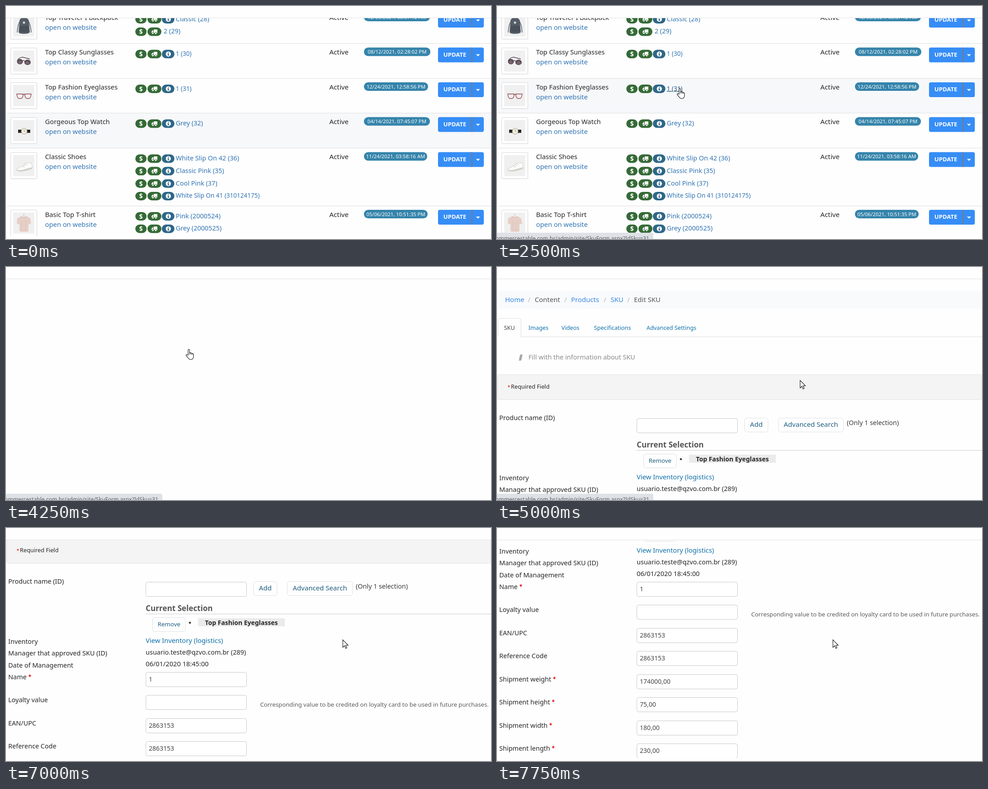
Write an HTML page that moves like this. It is 1080 by 519 pixels and loops after 8000 ms.

```html
<!DOCTYPE html>
<html lang="en">
<head>
<meta charset="utf-8">
<title>Editing a SKU</title>
<style>
  html, body { margin: 0; width: 100%; height: 100%; overflow: hidden; background: #fefefe; }
  svg { display: block; width: 100vw; height: 100vh; }
  text { font-family: "Noto Sans", "Open Sans", sans-serif; white-space: pre; }
</style>
</head>
<body>
<svg id="stage" viewBox="0 0 1080 519" xmlns="http://www.w3.org/2000/svg"></svg>
<script>
const LOOP = 8000;
const INK = '#262626', LINK = '#3174b3', FORM_LINK = '#0f70aa', GREEN = '#356a36', TEAL = '#3584ab';

const text = (x, y, size, fill, content, extra = '') =>
  `<text x="${x}" y="${y}" font-size="${size}" fill="${fill}" ${extra}>${content}</text>`;
const rect = (x, y, w, h, fill, r = 0, stroke = 'none') =>
  `<rect x="${x}" y="${y}" width="${w}" height="${h}" rx="${r}" fill="${fill}" stroke="${stroke}"/>`;
const path = (d, fill, extra = '') => `<path d="${d}" fill="${fill}" ${extra}/>`;
const group = (x, y, content) => `<g transform="translate(${x} ${y})">${content}</g>`;

// Product thumbnails, drawn inside a 59 x 59 frame
const art = {
  backpack:
    path('M22 18Q16 25 15 44M39 18Q45 25 46 44M25 14Q30 5 36 14', 'none', 'stroke="#59606a" stroke-width="1.5"') +
    path('M20 18Q21 11 30 11T41 18L43 43Q42 47 30 47T18 43Z', '#555d66') +
    path('M21 29H40L41 42Q31 45 20 42Z', '#48505a') +
    '<circle cx="30" cy="22" r="2.5" fill="#d9dcdf"/>',
  sunglasses:
    path('M15 29Q18 22 27 21L43 25M27 29Q30 27 32 31', 'none', 'stroke="#5a4953" stroke-width="1.5"') +
    '<ellipse cx="21" cy="31" rx="6.5" ry="6" fill="#51424d"/><ellipse cx="38" cy="32.5" rx="7" ry="6" fill="#51424d"/>' +
    '<ellipse cx="21" cy="32" rx="4.5" ry="4" fill="#77646f"/><ellipse cx="38" cy="33.5" rx="5" ry="4" fill="#77646f"/>',
  eyeglasses:
    path('M14 26H28Q28 36 23 36H18Q15 35 14 26ZM32 26H46Q45 35 42 36H37Q32 36 32 26ZM28 28Q30 26 32 28', '#f3eeee',
      'stroke="#8d4a50" stroke-width="1.4"'),
  watch:
    path('M17 27.5H25V34.5H17ZM36 27.5H44V34.5H36Z', '#22211f') +
    '<circle cx="30.5" cy="31" r="6.5" fill="#f3eee0" stroke="#a79f8b"/>' +
    path('M30.5 27V31L33 32', 'none', 'stroke="#817967" stroke-width=".8"'),
  shoes:
    path('M13 37Q20 35 27 30L35 22Q40 25 46 23L49 34Q42 38 30 41Q15 44 13 37Z', '#fbfbf9', 'stroke="#c9c8c2" stroke-width=".8"') +
    path('M13 38Q20 41 30 38T49 33V36Q39 41 27 42Q14 44 13 38Z', '#d2d0c8') +
    path('M27 30L31 33M30 27L34 30M33 24L37 27', 'none', 'stroke="#b5b3ac"'),
  shirt:
    path('M24 14L15 19 14 31 20 32 20 48Q30 50 40 48L40 32 46 31 44 19 35 14Q30 18 24 14Z', '#e6cfc6') +
    path('M24 14Q30 20 35 14M30 14Q28 9 31 9', 'none', 'stroke="#c9afa6"') +
    path('M25 24V47M34 23V48', 'none', 'stroke="#dac0b6" stroke-width=".8"'),
};
const thumb = (kind, y) => group(10, y,
  rect(.5, 1.5, 59, 58, '#ececec', 2) + rect(.5, .5, 58, 58, '#fff', 2, '#d8d8d8') +
  rect(6, 6, 47, 47, '#f0f0f0') + art[kind]);

function skuPills(y, withInfo) {
  const dollar = rect(288, -9.5, 25, 19, GREEN, 9.5) +
    text(300.5, 5, 14, '#fff', '$', 'font-weight="700" text-anchor="middle"');
  const truck = rect(315, -9.5, 31, 19, GREEN, 9.5) +
    path('M329-5H337V3H329ZM328-3H326L324 0V3H328Z', '#fff') +
    `<g fill="#fff" stroke="${GREEN}"><circle cx="327" cy="3.5" r="2.2"/><circle cx="333.5" cy="3.5" r="2.2"/></g>`;
  const info = rect(347, -9.5, 28, 19, '#2e6788', 9.5) + '<circle cx="361.5" r="5.7" fill="#fff"/>' +
    path('M360.5-4H362.7V-2.2H360.5ZM359.7-1H362.7V2.2H363.5V3.6H359.7V2.2H360.5V.4H359.7Z', '#2e6788');
  return group(0, y, dollar + truck + (withInfo ? info : ''));
}

const updateButton = y => group(962, y,
  rect(0, 0, 102, 33, '#368df6', 4) + rect(74, 0, 2.5, 33, '#6c7f92') +
  text(37.5, 20, 13.2, '#fff', 'UPDATE', 'font-weight="700" text-anchor="middle"') +
  path('M84.5 15H93.5L89 19.5Z', '#fff'));

const products = [
  { y: 5.5, h: 77.5, kind: 'backpack', name: 'Top Traveler I Backpack', skus: ['Classic (28)', '2 (29)'], date: '12/03/2021, 08:37:12 AM', w: 147 },
  { y: 83, h: 77.5, kind: 'sunglasses', name: 'Top Classy Sunglasses', skus: ['1 (30)'], date: '08/12/2021, 02:28:02 PM', w: 148 },
  { y: 160.5, h: 77.5, kind: 'eyeglasses', name: 'Top Fashion Eyeglasses', skus: ['1 (31)'], date: '12/24/2021, 12:58:56 PM', w: 143 },
  { y: 238, h: 78, kind: 'watch', name: 'Gorgeous Top Watch', skus: ['Grey (32)'], date: '04/14/2021, 07:45:07 PM', w: 147 },
  { y: 316, h: 128.5, kind: 'shoes', name: 'Classic Shoes', date: '11/24/2021, 03:58:16 AM', w: 141,
    skus: ['White Slip On 42 (36)', 'Classic Pink (35)', 'Cool Pink (37)', 'White Slip On 41 (310124175)'] },
  { y: 444.5, h: 90, kind: 'shirt', name: 'Basic Top T-shirt', skus: ['Pink (2000524)', 'Grey (2000525)'], date: '05/06/2021, 10:51:35 PM', w: 142 },
];

function productRow({ y, kind, name, skus, date, w }) {
  const skuLines = skus.map((sku, i) => {
    const withInfo = sku !== '2 (29)';
    const size = /1 ?\(/.test(sku) ? 13.6 : 14.5;
    const id = sku === '1 (31)' ? 'id="skuLink"' : '';
    return skuPills(y + 24 + i * 27.8, withInfo) +
      text(withInfo ? 378 : 351, y + 28 + i * 27.8, size, LINK, sku, id);
  }).join('');
  return rect(2, Math.round(y), 1078, 1, '#dedede') + thumb(kind, Math.round(y + 9.5)) +
    text(87, y + 25, 14.75, INK, name) + text(87, y + 47, 14.8, LINK, 'open on website') + skuLines +
    text(720, y + 25, 15.3, INK, 'Active') + rect(797, y + 9.5, w, 19, TEAL, 9.5) +
    text(797 + w / 2, y + 23, 11.3, '#fff', date, 'font-weight="500" text-anchor="middle"') +
    updateButton(y + 9.5);
}

const input = (y, value = '') =>
  rect(311.5, y, 224, 32, '#fff', 4, '#c8c8c8') + text(318, y + 20.5, 14.1, '#444', value);
const button = (x, y, w, label, size) =>
  rect(x + .5, y + .5, w - 1, 31, '#fefefe', 5, '#dee0e3') +
  text(x + w / 2, y + 20, size, '#1f5f80', label, 'text-anchor="middle"');
const star = ' <tspan fill="#e00" font-weight="700" font-size="12" dy="-1">*</tspan>';

function form() {
  const crumbs = [['Home', 18], ['Content', 84], ['Products', 165], ['SKU', 253], ['Edit SKU', 305]];
  const tabs = [['Images', 70], ['Videos', 143.5], ['Specifications', 216], ['Advanced Settings', 333]];
  const fields = [['Name' + star, '1'], ['Loyalty value', ''], ['EAN/UPC', '2863153'], ['Reference Code', '2863153'],
    ['Shipment weight' + star, '174000,00'], ['Shipment height' + star, '75,00'],
    ['Shipment width' + star, '180,00'], ['Shipment length' + star, '230,00']];
  const labels = [['Product name (ID)', 341], ['Inventory', 475], ['Manager that approved SKU (ID)', 501], ['Date of Management', 527.5]];

  return rect(2, 53.5, 1078, 39, '#f8fafc') +
    crumbs.map(([s, x], i) =>
      text(x, 77.5, 15, i === 1 || i === 4 ? '#555' : '#3a86e0', s) +
      (i ? text(x - 15, 77.5, 15, '#b5b5b5', '/') : '')).join('') +
    path('M2.5 155.5V118.5Q2.5 114.5 6.5 114.5H49.5Q53.5 114.5 53.5 118.5V155.5H1080', 'none', 'stroke="#ddd"') +
    text(15.5, 139.5, 12.8, '#444', 'SKU') +
    tabs.map(([s, x]) => text(x, 139.5, 12.8, FORM_LINK, s)).join('') +
    path('M51.5 195H57L54 208.5H48.5Z', '#a8a8a8') +
    text(70, 205.5, 14.5, '#8a8a8a', 'Fill with the information about SKU') +
    rect(1.5, 239.5, 1078, 56, '#f4f4f4', 4, '#e2e2e2') +
    text(23.5, 271, 10.5, '#e00', '*') + text(31, 271, 12.8, INK, 'Required Field') +
    labels.map(([s, y]) => text(5, y, 14.5, INK, s)).join('') +
    input(337.5) + button(551, 336, 53, 'Add', 15.2) + button(626, 336, 146, 'Advanced Search', 15.1) +
    text(779, 352, 14.4, '#3a3a3a', '(Only 1 selection)') +
    text(311, 401.5, 17.2, '#555', 'Current Selection', 'font-weight="700"') + rect(311, 408, 769, 1, '#ccc') +
    button(326, 416, 74, 'Remove', 13.4) + '<circle cx="409.5" cy="428" r="2.3" fill="#333"/>' +
    rect(427.5, 418, 193.5, 18, '#ebebeb') +
    text(443, 432.5, 14.1, INK, 'Top Fashion Eyeglasses', 'font-weight="700"') +
    text(311, 472.5, 14.8, FORM_LINK, 'View Inventory (logistics)') +
    text(311, 498.5, 14.5, INK, 'usuario.teste@qzvo.com.br (289)') +
    text(311, 524.5, 14.7, INK, '06/01/2020 18:45:00') +
    fields.map(([label, value], i) => {
      const y = Math.round(538 + i * 51.43) + .5;
      return text(5, y + 15, 14.5, INK, label) + input(y, value);
    }).join('') +
    text(566, 615, 13.22, '#5a5a5a', 'Corresponding value to be credited on loyalty card to be used in future purchases.');
}

const hand =
  path('M5.5 13.5V2.2a1.6 1.6 0 0 1 3.3 0V8.5c.8-1 2.7-.8 3 .6c1-.7 2.6-.3 2.8.9c1.2-.4 2.9.2 2.9 1.8v5c0 3.5-2.3 6.4-6 6.4c-3.2 0-4.6-1.4-5.8-3.4L1.2 14.2c-1-1.6.8-2.8 2.2-1.7z',
    '#fff', 'stroke="#111" stroke-width="1.1"') +
  path('M8.8 8.5V12M11.8 9.2V12.2M14.6 10V12.5', 'none', 'stroke="#111"');
const arrow = path('M.5.5V17.5L4.4 13.8 7 19.7 9.6 18.5 7 12.8H12.4Z', '#fff', 'stroke="#111" stroke-width="1.1"');

const stage = document.getElementById('stage');
stage.innerHTML = `
  <clipPath id="page"><rect y="26" width="1080" height="486"/></clipPath>
  <rect width="1080" height="519" fill="#fefefe"/>
  <g clip-path="url(#page)">
    <g id="list"><rect id="hover" x="2" width="1078" fill="#f7f8fa"/>${products.map(productRow).join('')}</g>
    <g id="loading">${rect(2, 32.5, 23, 8.5, '#fff', 3.5, '#e0e2e4')}${rect(32.5, 32.5, 23.5, 8.5, '#2b83ab', 3.5)}</g>
    <g id="form">${form()}</g>
  </g>
  <rect y="26" width="1080" height="1" fill="#e2e2e2"/>
  <g id="status">
    ${path('M0 505H344Q348 505 348 509V519H0Z', '#dee1e6')}
    ${text(339, 522, 12.2, '#5c6066', 'ommercestable.com.br/admin/site/SkuForm.aspx?IdSku=31', 'text-anchor="end"')}
  </g>
  <g id="hand">${hand}</g>
  <g id="arrow">${arrow}</g>`;

const el = id => document.getElementById(id);
const show = (id, on) => el(id).setAttribute('visibility', on ? 'visible' : 'hidden');

// Each step holds until the next: [start ms, values...]
const cursorSteps = [[0, ''], [250, 'arrow', 277, 205], [500, 'hand', 338.5, 187.5], [750, 'hand', 396, 174],
  [1500, 'hand', 400, 183], [4750, 'arrow', 405, 183], [5000, 'arrow', 674.5, 252], [5250, 'arrow', 748.5, 247],
  [5500, 'arrow', 749.5, 248.5], [7500, 'arrow', 747.5, 248.5]];
const scrollSteps = [[0, 0], [6000, 68], [6250, 117], [7000, 217], [7250, 227], [7500, 321], [7750, 418]];
const stepAt = (steps, t) => steps.filter(([start]) => start <= t).pop();

function draw(t) {
  const between = (a, b) => t >= a && t < b;
  show('list', t < 3250);
  show('loading', between(3250, 4250));
  show('form', t >= 4500);
  show('status', between(1000, 5250));

  const row = products[t < 250 ? 3 : 2];
  el('hover').setAttribute('y', row.y);
  el('hover').setAttribute('height', row.h);

  const linkHover = between(1000, 3250);
  el('skuLink').setAttribute('fill', linkHover ? '#28587f' : LINK);
  el('skuLink').setAttribute('text-decoration', linkHover ? 'underline' : 'none');

  el('form').setAttribute('transform', `translate(0 ${-stepAt(scrollSteps, t)[1]})`);
  const [, shape, x = 0, y = 0] = stepAt(cursorSteps, t);
  for (const id of ['hand', 'arrow']) {
    show(id, id === shape);
    el(id).setAttribute('transform', `translate(${x} ${y})`);
  }
}

const begin = performance.now();
function tick() {
  draw((performance.now() - begin) % LOOP);
  requestAnimationFrame(tick);
}
tick();
</script>
</body>
</html>
```
